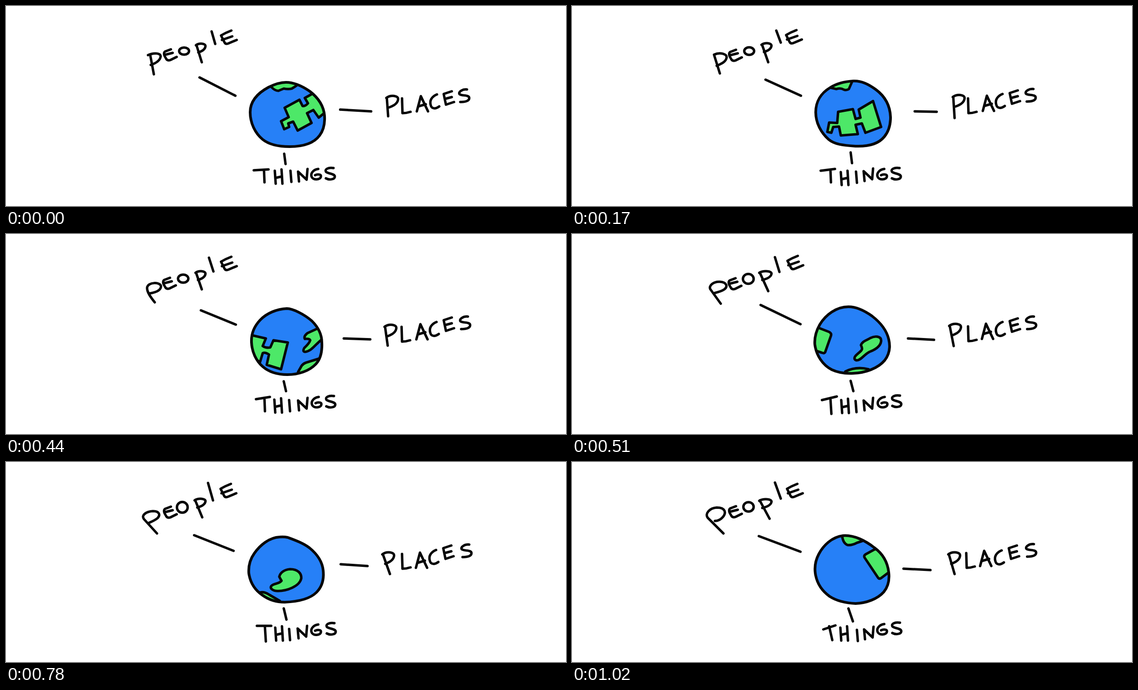
An HTML page for the animation above (1190 ms loop, 1250 by 448 pixels).

```html
<!DOCTYPE html>
<html lang="en">
<head>
<meta charset="utf-8">
<title>People, places, things</title>
<style>
  html, body { margin: 0; width: 100%; height: 100%; overflow: hidden; background: #fff; }
  svg { display: block; width: 100%; height: 100%; }
  path { stroke-linecap: round; stroke-linejoin: round; }
  .ink { fill: none; stroke: #060606; stroke-width: 5.5; }
  #sea { fill: #2680f7; }
  #land { fill: #4de868; stroke: #060606; stroke-width: 5.6; }
  #rim { fill: none; stroke: #060606; stroke-width: 6; }
</style>
</head>
<body>
<svg viewBox="0 0 1250 448" role="img" aria-label="People, places, things">
  <clipPath id="disc"><path id="edge"/></clipPath>
  <path id="sea"/>
  <g clip-path="url(#disc)"><path id="land"/></g>
  <path id="rim"/>
  <path id="lines" class="ink"/>
  <g id="letters"></g>
</svg>
<script>
const HOLD = 170;

// Letters that keep their shape: strokes, then a small "dx,dy" wobble per pose
const letters = [
  // peOple
  ['M367 97L354 102Q350 105 353 112L357 119Q360 123 366 121L380 114M355 109L371 105', '1,0 -1,1 -1,1 -2,2 1,3 0,1 -1,2'],
  ['M503 50Q490 55 480 61L488 77Q490 81 496 79L515 71M482 71L505 63', '0,5 -2,4 0,1 1,-1 -1,-1 -2,0 0,-1'],
  // pLACES
  ['M884 207L885 240Q894 240 903 237', '0,0 0,0 -1,1 0,0 0,-1 -1,-1 -4,-3'],
  ['M916 236L925 202L941 236M919 225L936 220', '1,0 1,-1 0,0 -1,-1 -1,1 -1,0 -5,-3'],
  ['M962 198C950 203 945 212 948 222C950 231 959 231 967 225', '0,0 -1,-1 -1,-1 -1,-1 -2,-1 0,-2 -3,0'],
  ['M995 190L977 196L982 220L1000 214M980 207L995 203', '0,1 0,-1 0,-3 0,-1 -1,-3 -2,-3 -2,-3'],
  ['M1030 186C1020 185 1011 191 1013 196C1016 201 1035 197 1035 205C1035 212 1026 214 1015 214', '-1,1 0,0 1,-1 1,-1 4,-1 2,-2 1,-2'],
  // tHINGS
  ['M600 371L602 400M615 368L617 400M602 387L615 384', '0,-2 0,1 -1,0 1,1 1,0 -1,0 -1,0'],
  ['M633 372L635 397', '2,-3 1,-1 -1,0 0,2 -1,2 -2,-1 3,4'],
  ['M653 395L651 373L670 391L672 367', '1,-2 0,-3 1,0 0,0 0,0 1,2 1,2'],
  ['M697 365C684 367 680 376 682 382C685 391 703 390 703 381C703 376 694 377 690 379', '0,0 0,0 1,0 1,0 0,-1 0,-1 0,-2'],
  ['M731 363C719 361 711 366 714 371C718 376 734 375 734 382C734 389 721 390 714 386', '0,0 0,0 1,0 1,-1 2,-2 2,-1 1,-3']
];

// big: first P; o: centre and radii; p1, p2: P stems; lines: l, T and the three rays
const poses = [
  {
    globe: 'M625 171C611 171 598 176 586 182C560 196 545 215 545 238C545 262 556 285 573 299C588 311 610 315 633 315C660 315 686 309 700 290C709 278 712 262 711 246C709 222 695 204 678 191C662 180 645 171 625 171Z',
    land: 'M592 181Q600 190 608 190L620 185Q630 187 638 185Q645 181 650 177L640 160H600Z M622 228L655 210L662 224Q668 225 674 218L667 206L685 196L720 195V232L698 250L686 233L672 240L682 262L651 279L641 259L630 263L632 271L621 276L614 258L631 249Z',
    big: 'M317 110C330 104 347 105 345 114C343 124 332 129 323 132M322 110L330 153',
    o: [397.5, 101, 11, 8], p1: [425, 87, 437, 126], p2: [850, 205, 853, 247],
    lines: 'M459 57L467 85M553 368L586 366M576 370L577 395M432 160L512 201M746 232L815 236M621 331L624 354'
  },
  {
    globe: 'M628 168C610 169 590 174 576 183C556 195 544 214 544 238C544 262 556 284 573 299C586 310 605 312 633 314C662 315 684 309 697 293C707 281 711 267 711 249C710 222 697 201 678 187C662 175 645 167 628 168Z',
    land: 'M577 183L590 186Q600 183 606 187Q612 190 618 186L625 170L600 160Z M594 237L627 231L633 253L644 250L640 232L672 213L690 271L655 284L647 263L633 266L638 287L600 290L596 270L583 271L579 284L570 282L574 261L592 262Z',
    big: 'M330 151L317 109C330 103 347 107 345 116C343 126 332 130 323 134',
    o: [395.5, 101, 11, 8.5], p1: [424, 86, 438, 126], p2: [851, 203, 854, 251],
    lines: 'M456 55L466 82M555 369L587 365M577 370L578 395M432 165L511 201M765 236L814 237M622 328L625 352'
  },
  {
    globe: 'M627 167C605 168 582 177 567 193C553 208 547 224 548 243C549 264 558 284 573 297C588 310 606 315 628 315C653 315 677 307 692 291C702 280 706 263 705 243C705 225 697 209 683 195C666 180 640 167 627 167Z',
    land: 'M545 226L580 234L573 251Q580 256 590 254L597 238L629 243L614 303L582 293L587 270Q578 264 573 267L567 287L540 270Z M697 211L673 222Q664 229 667 235Q678 234 679 238Q677 245 666 255Q661 264 668 264C682 262 688 250 704 237L720 225Z M652 309L660 295Q664 290 670 288L699 279L705 300L670 325Z',
    big: 'M332 153C324 143 314 130 315 120C317 107 345 107 346 117C346 127 333 131 321 133',
    o: [395.5, 100, 11.5, 9], p1: [424, 86, 437, 124], p2: [846, 207, 852, 250],
    lines: 'M453 53L463 84M558 370L589 365M577 371L578 397M435 171L513 203M754 234L813 236M620 330L625 352'
  },
  {
    globe: 'M617 163C590 163 566 181 553 203C544 219 541 233 542 247C545 272 560 294 580 304C595 311 610 313 628 312C655 311 683 301 698 283C708 270 711 253 707 236C702 214 688 198 670 184C652 171 634 163 617 163Z',
    land: 'M540 206L573 219Q580 222 578 228L565 265Q563 268 558 266L540 260Z M666 233C676 228 691 228 690 240C689 250 680 258 664 264C652 270 644 284 635 283C628 281 630 275 636 270C645 261 651 261 645 249C648 240 658 238 666 233Z M610 308Q635 296 662 303L650 325H615Z',
    big: 'M332 156L309 124C304 116 316 106 330 107C346 108 348 118 340 124C334 128 327 130 319 132',
    o: [393.5, 100.5, 12, 11], p1: [419, 86, 438, 128], p2: [843, 205, 852, 251],
    lines: 'M453 52L463 85M558 372L591 364M577 371L579 403M421 159L510 202M750 234L808 237M622 329L628 352'
  },
  {
    globe: 'M611 168C588 169 567 186 554 205C544 219 541 234 542 249C545 270 556 287 572 298C587 309 603 314 622 314C648 313 677 308 693 292C706 279 710 262 708 243C706 222 693 205 677 192C662 181 645 175 629 169Q620 167 611 168Z',
    land: 'M610 257C612 248 621 241 634 240C652 240 660 250 659 261C655 279 626 289 607 289C595 289 589 283 592 278C598 271 609 274 615 266Q612 261 610 257Z M564 293Q575 289 587 297L611 311L590 325L560 305Z',
    big: 'M337 160L308 128C301 119 313 111 328 110C343 110 345 119 338 126C332 131 324 134 318 137',
    o: [393.5, 101.5, 12, 12], p1: [422, 85, 438, 124], p2: [841, 206, 857, 251],
    lines: 'M451 47L462 86M560 367L592 367M578 370L580 402M420 164L508 199M747 229L807 233M620 328L626 353'
  },
  {
    globe: 'M620 166C593 167 568 181 553 202C542 217 537 233 539 248C541 267 553 286 573 299C590 310 611 317 635 317C660 317 685 310 698 293C708 280 711 263 707 244C702 221 691 204 675 190C661 178 642 167 620 166Z',
    land: 'M632 168L629 178Q631 183 637 183L661 186L670 180L650 160Z M553 278C565 281 573 276 576 270C581 259 600 257 606 271C609 286 602 295 589 295L576 296L560 305L540 285Z',
    big: 'M337 160L302 124C296 115 307 103 326 102C346 102 347 112 339 121C334 127 327 131 320 134',
    o: [392, 101.5, 11.5, 10.5], p1: [418, 87, 440, 130], p2: [840, 206, 854, 245],
    lines: 'M449 44L462 82M559 371L588 369M576 371L579 395M404 158L509 201M756 238L815 242M618 324L628 353'
  },
  {
    globe: 'M605 165C580 168 561 187 551 206C543 221 541 234 543 249C546 270 557 288 575 301C592 312 612 316 633 317C657 316 682 307 696 291C706 279 709 264 707 247C704 222 693 205 675 192C656 177 630 163 605 165Z',
    land: 'M603 166Q605 182 615 186Q625 187 636 181L648 177L640 155H603Z M675 196L655 207Q651 210 653 214L683 259Q686 263 690 260L706 248L725 240L700 190Z',
    big: 'M338 160L303 125C296 116 307 103 323 102C342 102 345 113 337 123C332 129 325 132 319 132',
    o: [394, 100.5, 11.5, 10.5], p1: [419, 86, 441, 127], p2: [841, 206, 854, 251],
    lines: 'M453 46L466 82M561 375L588 366M574 368L581 399M417 166L510 201M740 239L800 242M617 328L627 357'
  }
];

const el = id => document.getElementById(id);
const setPath = (id, d) => el(id).setAttribute('d', d);

const glyphs = letters.map(([d, wobble]) => {
  const node = document.createElementNS('http://www.w3.org/2000/svg', 'path');
  node.setAttribute('class', 'ink');
  node.setAttribute('d', d);
  el('letters').append(node);
  return { node, shifts: wobble.split(' ') };
});

const ring = ([x, y, rx, ry]) =>
  `M${x - rx} ${y}a${rx} ${ry} 0 1 1 ${2 * rx} 0a${rx} ${ry} 0 1 1 ${-2 * rx} 0`;

// A straight stem with a bowl hung from its top, reaching to `right`
function letterP([x, y, x2, y2], right, h) {
  const w = right - x;
  const c = [0.35 * w, -0.35 * h, 1.1 * w, -0.3 * h, w, 0.2 * h];
  const back = [-0.05 * w, 0.4 * h, -0.4 * w, 0.65 * h, -0.75 * w, 0.8 * h];
  return `M${x2} ${y2}L${x} ${y}M${x - 1} ${y + 1}c${c.join(' ')}c${back.join(' ')}`;
}

let shown = -1;
function draw(now) {
  const i = Math.floor(now / HOLD) % poses.length;
  if (i !== shown) {
    shown = i;
    const p = poses[i];
    for (const id of ['edge', 'sea', 'rim']) setPath(id, p.globe);
    setPath('land', p.land);
    setPath('lines', p.lines + p.big + ring(p.o) + letterP(p.p1, 446, 16) + letterP(p.p2, p.p2[0] + 26, 21));
    for (const g of glyphs) g.node.setAttribute('transform', `translate(${g.shifts[i]})`);
  }
}

const start = performance.now();
function tick() {
  draw(performance.now() - start);
  requestAnimationFrame(tick);
}
tick();
</script>
</body>
</html>
```
